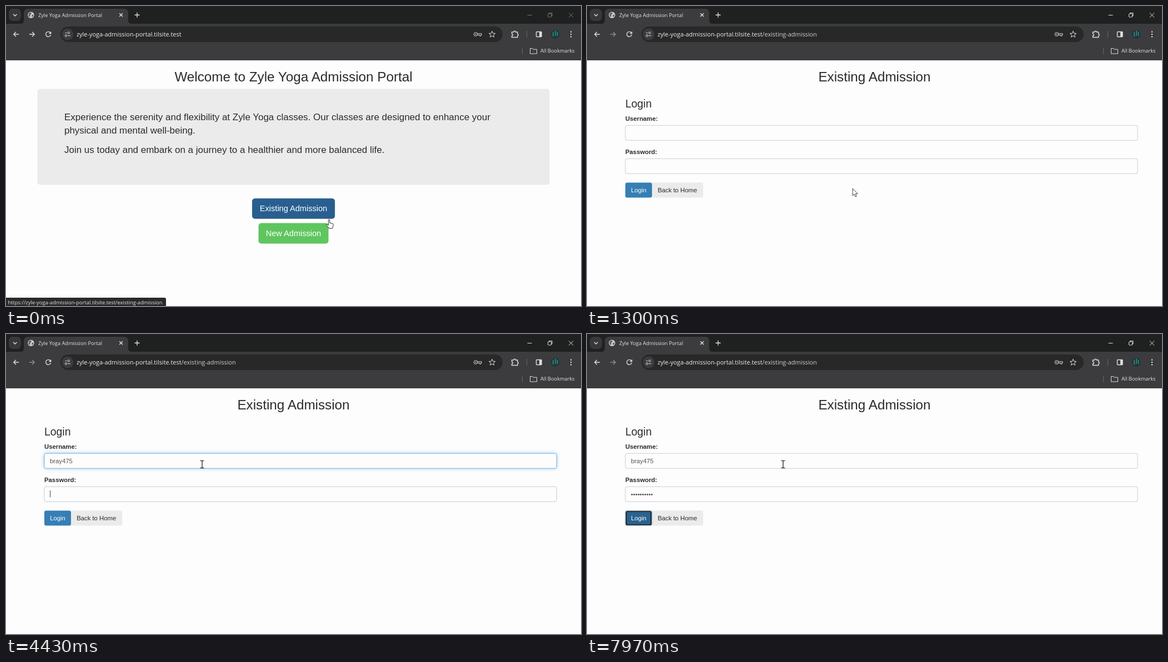
An HTML page for the animation above (8000 ms loop, 1035 px wide and 541 px high).

```html
<!DOCTYPE html>
<html lang="en">
<head>
<meta charset="utf-8">
<title>Admission portal</title>
<style>
html, body { margin: 0; width: 1035px; height: 541px; overflow: hidden; background: #fdfdfd; }
svg { display: block; }
text { font: 11.32px "Liberation Sans", Arial, sans-serif; fill: #2b2b2b; white-space: pre; }
.ui { font: 9.2px "Open Sans", "Noto Sans", sans-serif; fill: #e3e3e3; }
.url { font-size: 10.9px; fill: #eee; }
.h2 { font-size: 24.26px; }
.h3 { font-size: 19.4px; }
.lead { font-size: 16.98px; }
.big { font-size: 14.55px; }
.mid { text-anchor: middle; }
.light { fill: #fff; }
.bold { font-weight: bold; }
.value { fill: #555; }
.icon { fill: none; stroke: #dedede; stroke-width: 1.4; }
.thin { stroke-width: 1; }
.field { fill: #fdfdfd; stroke: #ccccd6; }
.focus { fill: #fdfdfd; stroke: #76b6ea; filter: drop-shadow(0 0 3px rgba(102, 175, 233, .65)); }
</style>
</head>
<body>
<svg width="1035" height="541" viewBox="0 0 1035 541">
  <!-- browser frame -->
  <path fill="#1f2020" d="M0 0h1035v33H0z"/>
  <path fill="#3c3c3f" d="M0 32h1035v66H0zM26 32q6 0 6-6V13q0-8 8-8h172q8 0 8 8v13q0 6 6 6z"/>
  <rect x="5" y="5" width="22" height="22" rx="7" fill="#38383b"/>
  <path class="icon" d="M13 14.7l3.2 3.2 3.2-3.2"/>
  <circle cx="45" cy="16.300" r="5.700" fill="#cfcfcf"/>
  <path fill="#5a5a5d" d="M41 13.500l3-2 2 1.500-1 2-2 .5 1 2-1 2.500-2.500-2.500zM46.500 16l3-.5-.5 3-2.500 1.500z"/>
  <text class="ui" x="58" y="20">Zyle Yoga Admission Portal</text>
  <path class="icon" d="M204.200 13.300l5.800 5.800m0-5.800l-5.800 5.800M231.500 16.300h9m-4.500-4.500v9"/>
  <g id="controls" class="icon thin">
    <path d="M938.500 16.500h8M1013 12.500l8 8m0-8l-8 8M977.500 14v-1.500h5.500v5.500h-1.500"/>
    <rect x="975.500" y="14" width="6" height="6" rx="1"/>
  </g>

  <path id="arrow-left" class="icon" d="M23 51h-9m4-4.200L13.800 51l4.200 4.200"/>
  <path id="forward" class="icon" d="M42 51h9m-4-4.200L51.200 51 47 55.200"/>
  <path class="icon" d="M80 48.600a4.500 4.500 0 1 0 .5 3.300M80.700 46.200v3.300h-3.300"/>
  <rect x="98" y="37" width="796" height="28" rx="14" fill="#282829"/>
  <circle cx="111" cy="51" r="10.500" fill="#3c3c3f"/>
  <path class="icon thin" d="M106.500 48.500h3m1.500 5h4.800"/>
  <circle class="icon thin" cx="112.800" cy="48.500" r="1.700"/>
  <circle class="icon thin" cx="108" cy="53.500" r="1.700"/>
  <text class="ui url" x="127" y="54.800">zyle-yoga-admission-portal.tilsite.test<tspan id="path" fill="#d0d0d0">/existing-admission</tspan></text>
  <g id="key" class="icon thin">
    <circle cx="845.500" cy="51" r="3.300"/>
    <circle cx="845.500" cy="51" r=".7"/>
    <path d="M848.700 49.800h7.300v2.500h-1.200v1.700h-2.300v-1.700h-3.800"/>
  </g>
  <path id="star" class="icon thin"/>
  <path class="icon" d="M910.500 47h3.200a1.800 1.800 0 0 1 3.600 0h3.400v3.200a1.900 1.900 0 0 1 0 3.700v2.600h-10.200v-2.800a1.800 1.800 0 0 0 0-3.600z"/>
  <path stroke="#66664a" d="M937.500 45v12M929.500 75v12"/>
  <rect class="icon" x="954.500" y="46.500" width="9.500" height="9" rx="1"/>
  <path fill="#dedede" d="M960 46.500h4v9h-4z"/>
  <circle cx="988.500" cy="51" r="8" fill="#20393b"/>
  <path stroke="#38a39b" stroke-width="1.300" d="M985 47v8M989 44.500v9M992.500 47v7"/>
  <g fill="#dedede"><circle cx="1017" cy="46.500" r="1.200"/><circle cx="1017" cy="51" r="1.200"/><circle cx="1017" cy="55.500" r="1.200"/></g>
  <path class="icon thin" d="M943.500 76.500h4l1.500 1.700h6.500v7.800h-12z"/>
  <text class="ui" x="962" y="84.300">All Bookmarks</text>

  <g id="home">
    <text class="h2 mid" x="517.500" y="136">Welcome to Zyle Yoga Admission Portal</text>
    <rect x="56.500" y="149.500" width="922" height="173" rx="4.850" fill="#ebebeb"/>
    <text class="lead" x="105" y="206">Experience the serenity and flexibility at Zyle Yoga classes. Our classes are designed to enhance your</text>
    <text class="lead" x="105" y="230">physical and mental well-being.</text>
    <text class="lead" x="105" y="265">Join us today and embark on a journey to a healthier and more balanced life.</text>
    <rect id="existing" x="443.400" y="347.400" width="148.200" height="35.800" rx="4.500" stroke="#204d74" stroke-width=".8"/>
    <text class="big mid light" x="517.500" y="370">Existing Admission</text>
    <rect x="454.500" y="391.500" width="126" height="37" rx="4.850" fill="#5fc65f"/>
    <text class="big mid light" x="517.500" y="414.500">New Admission</text>
    <path fill="#292a2a" d="M0 526h285q3 0 3 3v12H0z"/>
    <text class="ui" style="font-size:9.350px" x="3.500" y="538">https://zyle-yoga-admission-portal.tilsite.test/existing-admission</text>
  </g>

  <g id="login">
    <text class="h2 mid" x="517.500" y="136">Existing Admission</text>
    <text class="h3" x="69" y="182.500">Login</text>
    <text class="bold" x="69" y="206.500">Username:</text>
    <text class="bold" x="69" y="266.500">Password:</text>
    <g id="fields"></g>
    <path id="caret" stroke="#444"/>
    <rect x="69" y="318.500" width="48" height="27" rx="3.200" fill="#357fb5"/>
    <path fill="#ebebeb" d="M117 318.500h89q3.200 0 3.200 3.200v20.600q0 3.200-3.200 3.200h-89z"/>
    <g id="ring">
      <rect x="68.800" y="318.300" width="48.400" height="27.400" rx="3.200" fill="#fdfdfd" stroke="#9aa4ae" stroke-width=".8"/>
      <rect x="70.500" y="320" width="45" height="24" rx="2" fill="#2a628f" stroke="#101418" stroke-width="1.700"/>
    </g>
    <text class="mid light" x="93" y="335.800">Login</text>
    <text class="mid" x="162.700" y="335.800">Back to Home</text>
  </g>

  <g id="hand"><path fill="#fff" stroke="#111" stroke-width=".9" d="M-1.200 1.200a1.200 1.200 0 0 1 2.400 0v5l5 1.200q1.600.4 1.400 2l-.7 4q-.3 1.200-.7 2.600h-6.500q-1-2.400-4.400-5.600q-.8-1.400 1-1.600l2.500 1.400z"/></g>
  <g id="arrow"><path fill="#fff" stroke="#111" stroke-width=".8" d="M0 0v12.800l2.900-2.700 2 4.600 2.100-.9-2-4.500h4z"/></g>
  <g id="beam"><path fill="none" stroke="#111" stroke-width="1.200" d="M-3.500-6.500h2.500q1 0 1 1v11q0 1-1 1h-2.500M3.500-6.500h-2.500q-1 0-1 1v11q0 1 1 1h2.500"/></g>
</svg>
<script>
const LOOP = 8000, USER = "bray475";
const PRESS = 720, BUSY = 860, OPEN = 1000;
const USER_FOCUS = 1850, PASS_FOCUS = 4400, BUTTON_FOCUS = 6660;
const USER_KEYS = { start: 2650, gap: 220, count: USER.length };
const PASS_KEYS = { start: 4680, gap: 175, count: 10 };

const $ = id => document.getElementById(id);
const clamp = (v, lo, hi) => Math.min(hi, Math.max(lo, v));
const ramp = (t, start, time) => clamp((t - start) / time, 0, 1);
const ease = p => p * p * (3 - 2 * p);
const show = (id, on) => $(id).setAttribute("display", on ? "inline" : "none");
const typed = (t, k) => clamp(Math.floor((t - k.start) / k.gap) + 1, 0, k.count);

$("star").setAttribute("d", "M" + Array.from({ length: 10 }, (_, i) => {
  const a = i * Math.PI / 5 - Math.PI / 2, r = i % 2 ? 2.6 : 6;
  return [875 + r * Math.cos(a), 51.3 + r * Math.sin(a)];
}).join("L") + "z");

$("fields").innerHTML = [["user", 215], ["pass", 275]].map(([id, y]) => {
  const box = `x="69" y="${y}.3" width="922" height="27" rx="3.2"`;
  return `<rect class="field" ${box}/><rect class="focus" id="${id}Focus" ${box}/>
    <text class="value" id="${id}" x="79" y="${y + 17.5}"></text>`;
}).join("");

// Pointer path: time, x, y
const STOPS = [[0, 581.5, 385], [120, 581.5, 385], [620, 526.5, 365], [1080, 526.5, 365],
  [1720, 351, 235], [2050, 351, 235], [2250, 353, 235], [LOOP, 353, 235]];

function pointer(t) {
  const i = STOPS.findIndex(s => s[0] > t);
  const [t0, x0, y0] = STOPS[i - 1], [t1, x1, y1] = STOPS[i];
  const p = ease((t - t0) / (t1 - t0));
  return [x0 + (x1 - x0) * p, y0 + (y1 - y0) * p];
}

function drawPointer(t) {
  const [x, y] = pointer(t);
  const overField = t >= OPEN && (y > 215 && y < 242 || y > 275 && y < 302);
  const kind = t < BUSY ? "hand" : overField ? "beam" : "arrow";
  for (const id of ["hand", "arrow", "beam"]) show(id, id === kind);
  $(kind).setAttribute("transform", `translate(${x} ${y})`);
}

function drawCaret(t) {
  const inPass = t >= PASS_FOCUS;
  const keys = inPass ? PASS_KEYS : USER_KEYS;
  const n = typed(t, keys);
  const since = n ? keys.start + (n - 1) * keys.gap : inPass ? PASS_FOCUS : USER_FOCUS;
  show("caret", t >= USER_FOCUS && t < BUTTON_FOCUS && (t - since) % 1000 < 500);
  const x = 79.5 + (n ? $(inPass ? "pass" : "user").getComputedTextLength() : 0);
  $("caret").setAttribute("d", `M${x} ${inPass ? 282 : 222}v12.500`);
}

function draw(t) {
  const opened = t >= OPEN;
  show("home", !opened);
  show("login", opened);
  show("path", opened);
  show("key", t < USER_KEYS.start || t >= PASS_FOCUS);
  show("ring", t >= BUTTON_FOCUS);
  $("controls").setAttribute("opacity", t < PRESS ? .45 : 1);
  $("forward").setAttribute("opacity", opened ? .5 : 1);
  $("existing").setAttribute("fill", t < PRESS ? "#285f90" : "#204d74");

  $("user").textContent = USER.slice(0, typed(t, USER_KEYS));
  $("pass").textContent = "•".repeat(typed(t, PASS_KEYS));
  $("userFocus").setAttribute("opacity", ease(ramp(t, USER_FOCUS, 200)) - ease(ramp(t, PASS_FOCUS, 200)));
  $("passFocus").setAttribute("opacity", ease(ramp(t, PASS_FOCUS, 200)) - ease(ramp(t, BUTTON_FOCUS, 300)));
  drawCaret(t);
  drawPointer(t);
}

const begin = performance.now();
function tick() {
  draw((performance.now() - begin) % LOOP);
  requestAnimationFrame(tick);
}
tick();
</script>
</body>
</html>
```
